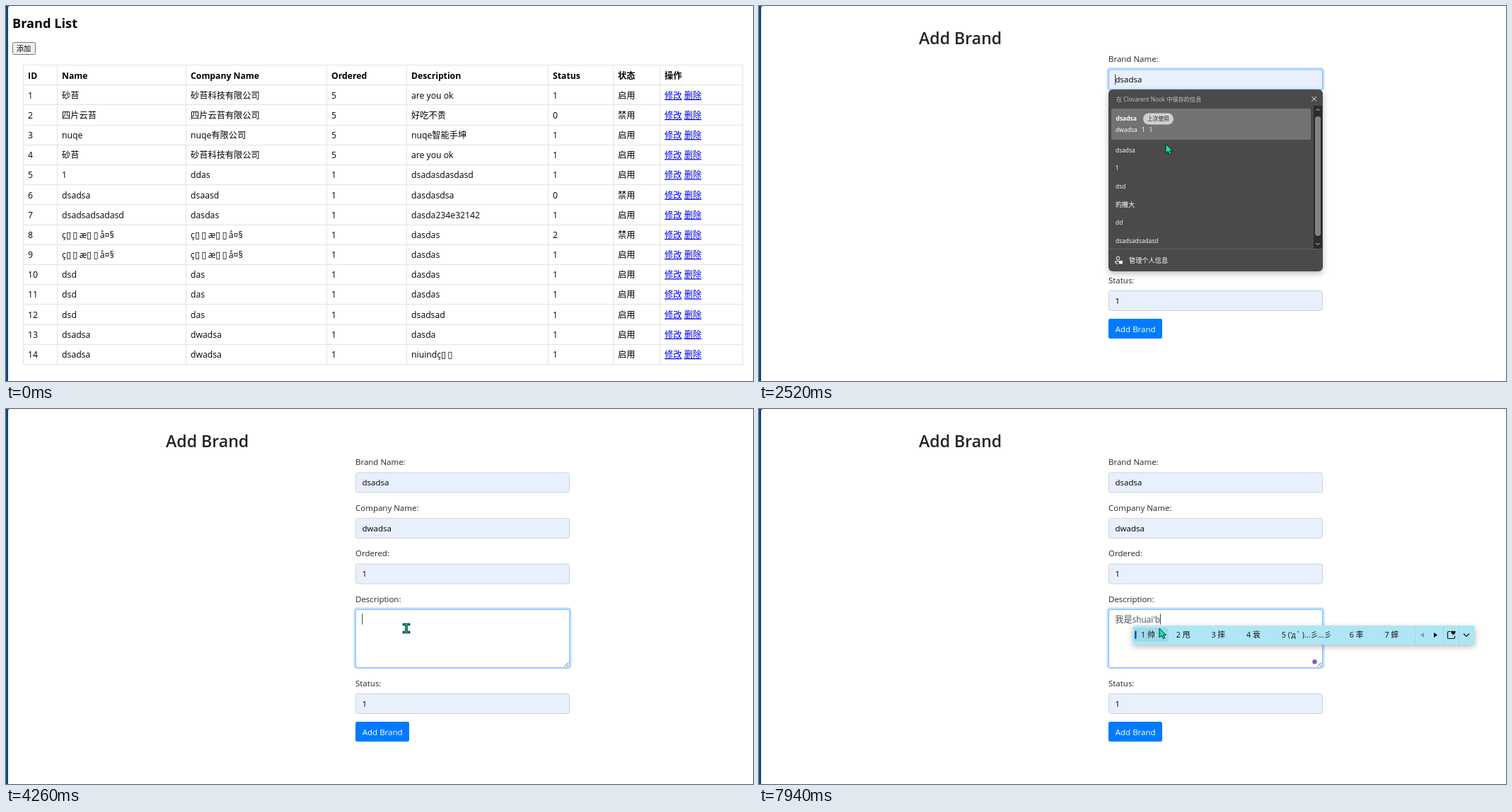
Animation, 1056 px wide and 530 px high, one loop 7.99 s. Source, as an HTML page:

```html
<!DOCTYPE html>
<html lang="zh">
<head>
<meta charset="utf-8">
<title>Brand List</title>
<style>
html, body { margin: 0; width: 100%; height: 100%; overflow: hidden; background: #fff }
svg { display: block; font-family: "Open Sans", "Noto Sans CJK SC", "Noto Sans CJK", "DejaVu Sans", sans-serif; white-space: pre }
.tofu { font: 13px "DejaVu Sans", sans-serif; letter-spacing: 2.2px }
#menu > rect:first-child, #ime > rect:first-child { filter: drop-shadow(0 3px 4px #0004) }
</style>
</head>
<body>
<svg id="stage" width="1056" height="530" viewBox="0 0 1056 530"></svg>
<script>
const LOOP = 7990;
const $ = id => document.getElementById(id);

const text = (x, y, s, size, extra = '') =>
  `<text x="${x}" y="${y}" font-size="${size}" ${extra}>${s.replace(/▯+/g, '<tspan class="tofu">$&</tspan>')}</text>`;
const rect = (x, y, w, h, fill, extra = '') =>
  `<rect x="${x}" y="${y}" width="${w}" height="${h}" fill="${fill}" ${extra}/>`;
const path = (d, stroke, extra = '') => `<path d="${d}" fill="none" stroke="${stroke}" ${extra}/>`;
const group = (id, body) => `<g id="${id}">${body}</g>`;

// List page
const columns = [24.5, 72.5, 254.5, 453.5, 566.5, 766.5, 858.5, 924.5, 1041.5];
const garbled = 'ç▯▯æ▯▯å¤§';
const brands = [
  ['砂苔', '砂苔科技有限公司', 5, 'are you ok', 1],
  ['四片云苔', '四片云苔有限公司', 5, '好吃不贵', 0],
  ['nuqe', 'nuqe有限公司', 5, 'nuqe智能手坤', 1],
  ['砂苔', '砂苔科技有限公司', 5, 'are you ok', 1],
  ['1', 'ddas', 1, 'dsadasdasdasd', 1],
  ['dsadsa', 'dsaasd', 1, 'dasdasdsa', 0],
  ['dsadsadsadasd', 'dasdas', 1, 'dasda234e32142', 1],
  [garbled, garbled, 1, 'dasdas', 2],
  [garbled, garbled, 1, 'dasdas', 1],
  ['dsd', 'das', 1, 'dasdas', 1],
  ['dsd', 'das', 1, 'dasdas', 1],
  ['dsd', 'das', 1, 'dsadsad', 1],
  ['dsadsa', 'dwadsa', 1, 'dasda', 1],
  ['dsadsa', 'dwadsa', 1, 'niuindç▯▯', 1],
];

function listPage() {
  const rowY = i => 83.5 + Math.round(i * 28.2);
  const textY = i => 102.6 + i * 28.17;
  const cell = (row, col, s, extra) => text(columns[col] + 6.6, textY(row), String(s), 12.2, extra);
  const link = 'fill="#00e" text-decoration="underline"';
  let out = text(9, 31, 'Brand List', 18.2, 'font-weight="700"') +
    rect(9.5, 51.5, 32, 17, '#efefef', 'id="add" stroke="#767676" rx="2"') +
    text(14.7, 63.8, '添加', 10.3);
  for (let i = 0; i <= 15; i++) out += path(`M24 ${rowY(i)}H1042`, '#e2e2e2');
  for (const x of columns) out += path(`M${x} 83V507`, '#e2e2e2');
  ['ID', 'Name', 'Company Name', 'Ordered', 'Description', 'Status', '状态', '操作']
    .forEach((s, c) => out += cell(0, c, s, 'font-weight="700"'));
  brands.forEach((brand, i) => {
    [i + 1, ...brand, brand[4] === 1 ? '启用' : '禁用'].forEach((s, c) => out += cell(i + 1, c, s));
    out += text(931, textY(i + 1), '修改', 12.2, link) + text(958.8, textY(i + 1), '删除', 12.2, link);
  });
  return out;
}

// Form page
const fields = [
  ['Brand Name:', 89.5, 'dsadsa'], ['Company Name:', 154, 'dwadsa'],
  ['Ordered:', 218.5, '1'], ['Description:', 283, ''], ['Status:', 402, '1'],
];
const fieldHeight = i => i === 3 ? 82 : 28;

function formPage() {
  let out = text(226, 54, 'Add Brand', 23.1, 'font-weight="600" fill="#212529"');
  fields.forEach(([label, y, value], i) => {
    const h = fieldHeight(i);
    out += text(494, y - 10.3, label, 11.5, 'fill="#212529"') +
      rect(492.9, y - 1.1, 305.2, h + 2.2, 'none', `id="ring${i}" rx="3.5" stroke="#bfdeff" stroke-width="2.6"`) +
      rect(494.5, y + .5, 302, h, '#fff', `id="box${i}" rx="2.5" stroke="#ced4da"`) +
      text(503.5, y + 18.7, value, 11.5, `id="value${i}"`);
  });
  return out + path('M789.5 364L795 358.5M793 364L795 362', '#555') +
    '<circle id="dot" cx="785.5" cy="357.3" r="3.2" fill="#8257e0"/>' +
    rect(494, 442, 76, 28, '#007bff', 'rx="2.5"') + text(503.8, 461, 'Add Brand', 11.5, 'fill="#fff"') +
    text(503.3, 302, '我是', 12.2, 'id="done" fill="#495057"') +
    text(503.3, 302, '', 11.7, 'id="typed" fill="#495057"') + rect(0, 0, .9, 15, '#222', 'id="caret"');
}

function autofillMenu() {
  const light = 'fill="#fff"';
  let out = rect(494, 118, 303, 257, '#4a4a4a', 'rx="6"') +
    text(505, 134.5, '在 Clovarent Nook 中保存的信息', 8.2, 'fill="#c4c4c4"') +
    path('M781.5 128l6.5 6.5M788 128l-6.5 6.5', '#eee') +
    rect(498, 145, 282, 44, '#737373', 'id="hover" rx="2"') +
    text(504.5, 162, 'dsadsa', 8.5, light + ' font-weight="700"') +
    rect(543, 151.5, 43, 16, '#d0d0d0', 'rx="8"') + text(549, 162.3, '上次使用', 7.7, 'fill="#222"');
  [['dwadsa', 504], ['1', 541], ['1', 551.5]].forEach(([s, x]) => out += text(x, 178.3, s, 8.6, light));
  ['dsadsa', '1', 'dsd', '的撒大', 'dd', 'dsadsadsadasd']
    .forEach((s, i) => out += text(504, 206.5 + i * 25.7, s, s === '的撒大' ? 9.1 : 8.4, light));
  return out + rect(784, 141, 12, 202, '#2c2c2c') + rect(786, 156, 8, 169, '#838383', 'rx="4"') +
    path('M787.5 148l2.5-2.5 2.5 2.5M787.5 335l2.5 2.5 2.5-2.5', '#ddd') +
    path('M494 343.5H797', '#626262') +
    '<circle cx="507.5" cy="356.5" r="2.4" fill="none" stroke="#fff"/>' +
    path('M509 361h-5.5v1q0 2.5 4 2.5', '#fff') + rect(509, 360, 5, 4.5, '#fff', 'rx="1"') +
    text(523, 363, '管理个人信息', 9.2, light);
}

// Input method bar: left, right, candidates
const bars = {
  woshi: [503, 721, ['我是', '卧室']],
  next: [528, 943, ['一个', '中国', '不', '你', '在', '真']],
  s: [528, 943, ['什么', '时候', '是', '上', '说', '三']],
  sh: [528, 967, ['是', '上', '说', '时', '谁', '事', '使']],
  shu: [528, 967, ['数', '书', '输', '树', '属', '熟', '叔']],
  shuai: [528, 1012, ['帅', '甩', '摔', '衰', "('д` )…彡…彡", '率', '蟀']],
};

function inputBar([left, right, words]) {
  const pitch = s => s.length > 4 ? 96 : 38.5 + 11.2 * s.length;
  let x = left + 12;
  let out = rect(left, 306, right - left, 27, '#aee6f5', 'rx="4"') +
    rect(left + 2, 309, pitch(words[0]) - 1, 20, '#9fd9e9', 'rx="3"') +
    rect(left + 3, 313.5, 2.6, 11.5, '#17599c', 'rx="1"');
  words.forEach((s, i) => {
    out += text(x, 323.3, `${i + 1} ${s}`, 10.8, 'fill="#111"');
    x += pitch(s);
  });
  return out + `<g transform="translate(${right} 319.5)">` +
    path('M-84.5-13V13M-44.5-13V13M-22.5-13V13', '#9dd6e6') +
    '<path d="M-77 0l5-3.5v7z" fill="#71a5b2"/><path d="M-53 0l-5-3.5v7z"/>' +
    path('M-34-5h-3q-1.5 0-1.5 1.5V3.5q0 1.5 1.5 1.5h7q1.5 0 1.5-1.5V1', '#111', 'stroke-width="1.2"') +
    '<path d="M-30.5 0l-3-3.2q-.5-2.8 1.5-2.8l1.5 1 1.5-1q2 0 1.5 2.8z"/>' +
    path('M-16-2l4 4 4-4', '#111', 'stroke-width="1.2"') + '</g>';
}

const arrow = '<path d="M0 0V13L3.2 10.2 5.3 14.5 7.7 13.4 5.7 9.3H9.5Z" fill="#14e3b0" stroke="#0b2b2b" stroke-linejoin="round"/>';
const beamPath = 'M-3.5-5.5H3.5M-3.5 5.5H3.5M0-5.5V5.5';
const beam = path(beamPath, '#083c34', 'stroke-width="3.6" stroke-linecap="square"') +
  path(beamPath, '#18b391', 'stroke-width="1.5"');

$('stage').innerHTML = rect(0, 0, 8, 530, '#0f4880') + rect(3, 0, 1053, 534, '#fff', 'rx="3"') +
  group('list', listPage()) + group('form', formPage()) +
  rect(815.5, 107, 2.5, 143, '#888', 'id="edge"') + group('menu', autofillMenu()) +
  group('ime', '') + group('pointer', group('arrow', arrow) + group('beam', beam));

// Pointer: time, x, y
const moves = [
  [140, 690, 516], [560, 192, 93], [900, 18, 62], [950, 16, 61], [1090, 16, 61],
  [1170, 97, 65], [1330, 292, 184], [1480, 292, 184], [2180, 560, 105], [2380, 560, 105],
  [2520, 575, 195], [2560, 577, 201], [2710, 577, 201], [2830, 585, 182], [3100, 585, 182],
  [3520, 568, 215], [3730, 566, 235], [3800, 566, 235], [4080, 566, 310],
];
// Typing: time, composing letters, bar
const typing = [
  [0, ''], [4590, 'w'], [4680, 'wo'], [5040, 'wos'], [5120, 'wosh'], [5310, 'wos'], [5500, 'wo'],
  [5680, 'w'], [5960, 'wo'], [6020, 'wos'], [6090, 'wosh'], [6160, 'woshi', 'woshi'], [6650, ''],
  [6820, '', 'next'], [7040, 's', 'next'], [7160, 's', 's'], [7310, 'sh', 's'], [7400, 'sh', 'sh'],
  [7580, 'shu', 'sh'], [7700, 'shu', 'shu'], [7850, 'shua', 'shu'], [7940, "shuai'b", 'shuai'],
];

const clamp = v => Math.max(0, Math.min(1, v));
const show = (id, on) => $(id).style.display = on ? '' : 'none';
const set = (id, attrs) => { for (const k in attrs) $(id).setAttribute(k, attrs[k]) };

function pointerAt(t) {
  const i = moves.findLastIndex(m => m[0] <= t);
  const a = moves[Math.max(i, 0)], b = moves[i + 1] || a;
  const p = b === a ? 0 : clamp((t - a[0]) / (b[0] - a[0]));
  return [a[1] + (b[1] - a[1]) * p, a[2] + (b[2] - a[2]) * p];
}

let shownBar;
function draw(t) {
  const [x, y] = pointerAt(t);
  const onForm = t >= 1480;
  show('list', !onForm);
  show('form', onForm);
  set('add', { fill: x < 42 && y < 69 ? '#e5e5e5' : '#efefef' });

  const second = t >= 2560 && t < 2760;
  const filled = t < 2470 ? 0 : second ? 1 : 5;
  const focus = t < 2320 ? -1 : t < 4150 ? 0 : 3;
  fields.forEach((_, i) => {
    const on = i < filled && i !== 3;
    show('value' + i, on);
    show('ring' + i, i === focus);
    set('box' + i, { fill: on ? '#e8f0fe' : '#fff', stroke: i === focus ? '#80bdff' : '#ced4da' });
  });

  const closing = clamp((t - 3030) / 150), opening = clamp((t - 2380) / 80);
  const menuOpen = t > 2380 && closing < 1;
  const scale = 1 - .04 * (closing + 1 - opening);
  show('menu', menuOpen);
  show('edge', menuOpen && closing > 0);
  set('menu', {
    opacity: opening * (1 - closing),
    transform: `translate(645.5 246.5) scale(${scale}) translate(-645.5 -246.5)`,
  });
  set('hover', second ? { y: 191, height: 25 } : { y: 145, height: 44 });
  show('hover', t > 2440);

  const [, letters, bar] = typing.findLast(s => s[0] <= t);
  const start = t >= 6650 ? 527.8 : 503.3;
  show('done', t >= 6650);
  show('dot', t >= 4680);
  $('typed').textContent = letters;
  set('typed', { x: start });
  show('ime', bar);
  if (bar && bar !== shownBar) $('ime').innerHTML = inputBar(bars[shownBar = bar]);

  show('caret', focus >= 0 && !(t >= 5730 && t < 5960));
  const width = onForm && letters ? $('typed').getComputedTextLength() : 0;
  set('caret', focus === 3 ? { x: start + width, y: 289.5 } : { x: t < 3030 ? 503.3 : 540.3, y: 96.5 });

  const overField = fields.some(([, top], i) => y > top && y < top + fieldHeight(i));
  const isBeam = onForm && x > 494 && overField && !menuOpen && !bar;
  show('pointer', t >= 140);
  show('beam', isBeam);
  show('arrow', !isBeam);
  set('pointer', { transform: `translate(${x} ${y})` });
}

function tick() {
  draw(performance.now() % LOOP);
  requestAnimationFrame(tick);
}
tick();
</script>
</body>
</html>
```
